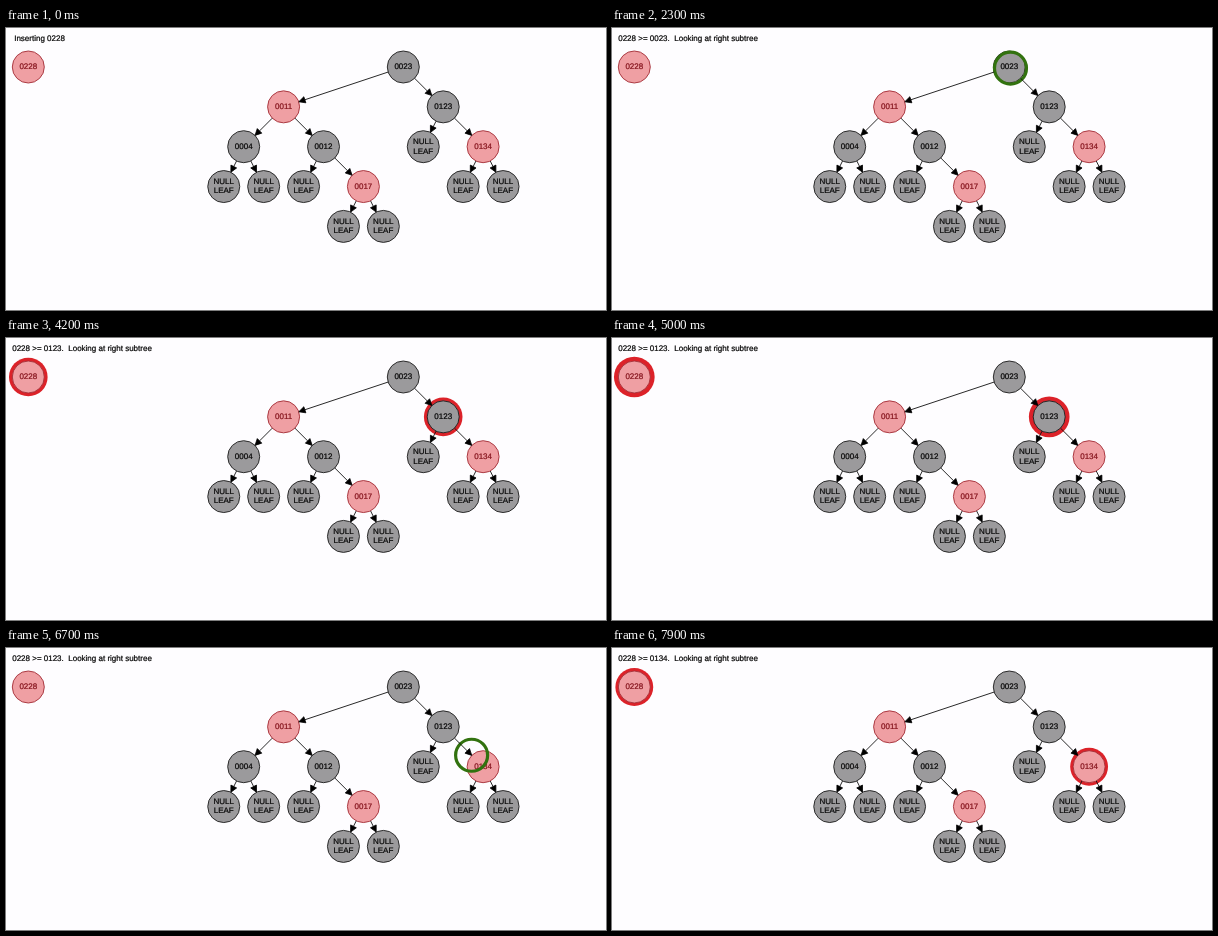
Recreate the animation shown at these times as an HTML page. Size 600 by 282 pixels, loop 8 s.

```html
<!DOCTYPE html>
<html lang="en">
<head>
<meta charset="utf-8">
<title>Tree insertion</title>
<style>
  html, body { margin: 0; width: 100%; height: 100%; overflow: hidden; background: #fefdff; }
  svg { display: block; width: 600px; height: 282px; }
  text {
    font: 8px "Liberation Sans", Arial, sans-serif; text-rendering: geometricPrecision;
    text-anchor: middle; fill: #080808; stroke: #080808; stroke-width: .22;
  }
  #msg { text-anchor: start; white-space: pre; }
  .node { fill: #9b9a9c; stroke: #1c1c1c; stroke-width: .9; }
  .red .node { fill: #ef9fa3; stroke: #a32d36; }
  .red text { fill: #85141d; stroke: #85141d; }
  .halo { fill: #dc2229; }
  #ring { fill: none; stroke: #32720f; stroke-width: 3.2; }
  .edge { stroke: #111; stroke-width: .9; }
  .head { fill: #000; stroke: #000; stroke-width: .8; }
</style>
</head>
<body>
<svg viewBox="0 0 600 282">
  <g id="halos"></g>
  <g id="nodes"></g>
  <circle id="ring" r="16"/>
  <g id="edges"></g>
  <text id="msg" y="12.8"></text>
</svg>
<script>
const R = 16, UNIT = 19.95, ROW = 39.85, ROOT_X = 397.3, TOP = 39;
const HEAD = 6.4, HEAD_HALF = 3.2;
const LOOP = 8000, TICK = 100;
const START = 612, STEP = 1640;          // compare, then move, one STEP each
const PULSE = 1180, PULSE_PEAK = 1400;
const $ = id => document.getElementById(id);

function add(parent, tag, attrs, text) {
  const el = document.createElementNS('http://www.w3.org/2000/svg', tag);
  for (const key in attrs) el.setAttribute(key, attrs[key]);
  if (text) el.textContent = text;
  parent.appendChild(el);
  return el;
}

function drawNode(x, y, label, red) {
  const g = add($('nodes'), 'g', { class: red ? 'red' : '' });
  add(g, 'circle', { class: 'node', cx: x, cy: y, r: R });
  const lines = label ? [label] : ['NULL', 'LEAF'];
  lines.forEach((line, i) =>
    add(g, 'text', { x, y: y + 2.2 + (i - (lines.length - 1) / 2) * 9.2 }, line));
  return { x, y };
}

function drawEdge(a, b) {
  const d = Math.hypot(b.x - a.x, b.y - a.y);
  const ux = (b.x - a.x) / d, uy = (b.y - a.y) / d;
  const x = b.x - ux * R, y = b.y - uy * R;
  const bx = x - ux * HEAD, by = y - uy * HEAD;
  const wx = -uy * HEAD_HALF, wy = ux * HEAD_HALF;
  add($('edges'), 'line', { class: 'edge', x1: a.x + ux * R, y1: a.y + uy * R, x2: bx, y2: by });
  add($('edges'), 'path', {
    class: 'head',
    d: `M${x} ${y}L${bx + wx} ${by + wy}L${bx - wx} ${by - wy}Z`
  });
}

// [column, label, red, left, right]; an empty child is a null leaf
const tree = [0, '0023', 0,
  [-6, '0011', 1,
    [-8, '0004', 0],
    [-4, '0012', 0, null, [-2, '0017', 1]]],
  [2, '0123', 0, null, [4, '0134', 1]]];
const placed = {};

function build([col, label, red, left, right], row = 0) {
  const at = drawNode(ROOT_X + col * UNIT, TOP + row * ROW, label, red);
  placed[label] = at;
  if (label) {
    drawEdge(at, build(left || [col - 1], row + 1));
    drawEdge(at, build(right || [col + 1], row + 1));
  }
  return at;
}

build(tree);
const fresh = drawNode(22.3, TOP, '0228', true);
const path = ['0023', '0123', '0134'];
const halos = [0, 1].map(() => add($('halos'), 'circle', { class: 'halo' }));
const show = (el, on) => el.setAttribute('visibility', on ? 'visible' : 'hidden');
const put = (el, x, y) => { el.setAttribute('cx', x); el.setAttribute('cy', y); };

function render(t) {
  const phase = (t - START) / STEP;
  const round = Math.floor(phase / 2);
  const part = phase - round * 2;
  const begun = phase >= 0, comparing = begun && part < 1, moving = begun && part >= 1;

  $('msg').textContent = begun
    ? `0228 >= ${path[round]}.\u00a0 Looking at right subtree` : 'Inserting 0228';
  $('msg').setAttribute('x', begun ? 6.2 : 8.2);

  halos.forEach(h => show(h, comparing));
  show($('ring'), moving);
  if (comparing) {
    const p = (t - PULSE_PEAK) / PULSE;
    const r = R + 4.5 - 3.2 * Math.abs(p - Math.round(p));
    [fresh, placed[path[round]]].forEach((n, i) => {
      put(halos[i], n.x, n.y);
      halos[i].setAttribute('r', r);
    });
  }
  if (moving) {
    const a = placed[path[round]], b = placed[path[round + 1]], k = part - 1;
    put($('ring'), a.x + (b.x - a.x) * k, a.y + (b.y - a.y) * k);
  }
}

function loop() {
  render(Math.floor(performance.now() % LOOP / TICK) * TICK);
  requestAnimationFrame(loop);
}
loop();
</script>
</body>
</html>
```
